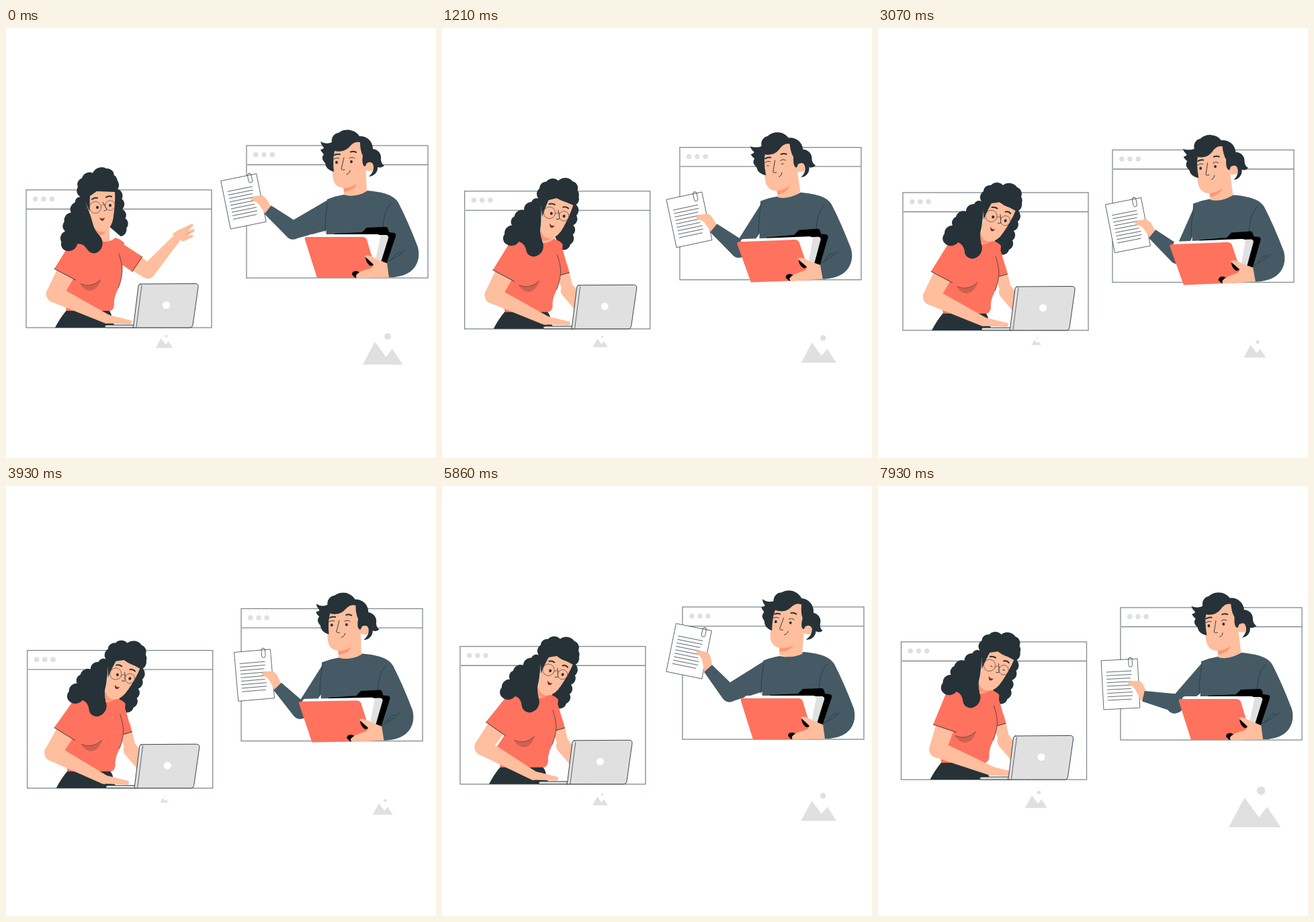
An HTML page for the animation above (8 s loop, 640 px wide and 640 px high).

```html
<!DOCTYPE html>
<html lang="en">
<head>
<meta charset="utf-8">
<title>Online meeting</title>
<style>
html, body { margin: 0; width: 100%; height: 100%; overflow: hidden; background: #fff; }
svg { display: block; width: 100vw; height: 100vh; }
.skin { fill: #ffbe9d; }
.shade { fill: #ff9677; }
.dark { fill: #263238; }
.red { fill: #ff725e; }
.knit { fill: #455a64; }
.gray { fill: #e0e0e0; }
.frame { fill: none; stroke: #7f8a90; stroke-width: 1.3; }
.ink { fill: none; stroke: #263238; stroke-width: .9; stroke-linecap: round; stroke-linejoin: round; }
.brow { stroke-width: 2; }
.fold { stroke-width: .7; }
.rim { stroke: #6b4a40; }
</style>
</head>
<body>
<svg id="stage" viewBox="0 0 640 640"></svg>
<script>
const LOOP = 8000;
const LEAN = 26; // tilt of the woman's head while typing

const frame = (x, y, w, h) => `
  <rect class="frame" x="${x}" y="${y}" width="${w}" height="${h}"/>
  <path class="frame" d="M${x + 1} ${y + 28.5}H${x + w}"/>
  ${[13.8, 26, 38.2].map(d => `<circle class="gray" cx="${x + d}" cy="${y + 13.5}" r="3.8"/>`).join('')}`;

const picture = `
  <path class="gray" d="M-30 23.5L-12 -10.5L4.5 12L14 0L29.5 23.5Z"/>
  <circle class="gray" cx="7" cy="-18.5" r="4.8"/>`;

// chain of outward bumps through the given points
const bumps = (from, ...pts) => {
  let [x, y] = from;
  return `L${from}` + pts.map(([a, b]) => {
    const r = Math.hypot(a - x, b - y) * .68;
    [x, y] = [a, b];
    return `A${r} ${r} 0 0 1 ${a} ${b}`;
  }).join('');
};

const backHair = 'M150 240' + bumps([200, 240], [205, 252], [202, 268], [201, 284],
  [195, 298], [193, 312], [188, 326], [175, 333]) + 'L165 310L150 290Z';
const frontHair = 'M147 254' + bumps([147, 254], [150, 239], [161, 230], [179, 230], [200, 233], [206, 247], [202, 262]) +
  'L193 264Q178 262 166 247Q156 252 150 266Q149 284 146 298Q144 306 147 318' +
  bumps([147, 318], [136, 339], [122, 330]) + 'Q121 318 112 315' +
  bumps([112, 315], [93, 317], [92, 302], [104, 290], [109, 277], [124, 269], [136, 258], [147, 254]) + 'Z';

const woman = `
  ${frame(30, 241, 276, 205)}
  <path id="wBackHair" class="dark" d="${backHair}"/>
  <g id="wNeck">
    <path class="skin" d="M129 285L154 290L154 318Q143 328 132 318Z"/>
    <path class="shade" d="M131 298Q138 306 149 302Q143 312 132 308Z"/>
  </g>
  <path id="rUpper" class="skin"/><path id="rFore" class="skin"/>
  <g id="rHand">
    <path class="skin" d="M-4 -8Q8 -10 14 -8L29 -7Q32 -5 29 -3L18 -1L27 1Q29 4 26 5L15 5L22 8Q22 11 18 11L4 9Z"/>
    <path class="ink fold" style="stroke:#f2916f" d="M15 -3L24 -3M13 2L21 3"/>
  </g>
  <path id="rSleeve" class="red"/><path id="rHem" class="ink"/>
  <path class="dark" d="M73 446Q80 432 91 419L152 419Q157 424 158 432L162 446Z"/>
  <path class="red" d="M104 318Q116 311 132 314Q150 323 163 312Q172 315 176 320L173 362Q172 378 166 390Q160 402 161 412Q160 420 155 421L90 421Q88 410 86 400L85 390L105 360Z"/>
  <path fill="#d0604f" d="M111 382Q126 388 141 376Q135 391 124 391Q116 390 111 382Z"/>
  <path class="ink fold" d="M111 381Q126 388 141 375M168 336Q173 350 173 362Q172 376 167 387"/>
  <path id="lUpper" class="skin"/>
  <path id="lSleeve" class="red"/><path id="lHem" class="ink"/>
  <path id="lFore" class="skin"/><path id="lHand" class="skin"/>
  <g class="ink">
    <path class="gray" d="M149 442H192V446H149Q147 446 147 444Q147 442 149 442Z"/>
    <path class="gray" d="M200 381L282 380.5Q287 381 286 386L278 442Q277 446 274 446L189 446L190 441L197 384Q197.5 381 200 381Z"/>
    <path class="fold" d="M202 383L194 445"/>
  </g>
  <circle cx="238.5" cy="412.5" r="5.5" fill="#fff"/>
  <g id="wFace">
    <path class="skin" d="M125 250Q123 284 130 294Q138 304 148 302Q158 297 160 280Q163 260 162 244L135 243Z"/>
    <path class="ink brow" d="M128 255Q132 252 136 253M149 252Q153 249 157 251"/>
    <path class="ink" d="M144 259Q148 266 150 270Q149 272 146 272"/>
    <ellipse class="dark wEye" cx="136" cy="267" rx="2"/><ellipse class="dark wEye" cx="155" cy="264" rx="2"/>
    <path fill="#7d2f2a" d="M139 282Q143 285 147 282Q146 287 143 287Q140 286 139 282Z"/>
  </g>
  <path id="wFrontHair" class="dark" d="${frontHair}"/>
  <g id="wGlasses" class="ink fold rim">
    <circle cx="133" cy="267" r="8.7"/><circle cx="155" cy="264" r="7.3"/>
    <path d="M141.5 265Q145 261 148 263M124 268L118 269"/>
  </g>`;

const textLines = Array.from({ length: 9 }, (_, i) =>
  `M-20 ${-19 + i * 5.25}H${i % 3 === 2 ? 15 : 17}`).join('');

const manHair = 'M468 169Q477 174 485 170' +
  bumps([485, 170], [495, 156], [526, 161], [546, 180], [558, 195]) + 'Q558 202 563 205Q558 209 553 207' +
  bumps([553, 207], [540, 221]) +
  'Q548 214 547 206Q546 197 537 201Q535 206 534 206Q529 204 531 190Q527 182 527 170Q518 168 511 177' +
  'Q503 186 489 183Q486 195 488 214Q476 211 475 201Q468 194 473 188Q469 184 468 181Q473 180 473 178Q469 174 468 169Z';

const man = `
  ${frame(358, 175, 270, 197)}
  <g id="sheet">
    <rect x="-27" y="-36.5" width="54" height="73" fill="#fff" stroke="#263238" stroke-width=".7"/>
    <path class="ink fold" d="${textLines}"/>
    <rect class="ink fold" x="13.5" y="-39" width="5.5" height="14" rx="2.7"/>
  </g>
  <path id="mWrist" class="skin"/>
  <path id="mHand" class="skin" d="M12 -3Q20 -5 29 -3Q35 2 36 10L33 20L27 22Q24 14 21 8Q18 4 12 1Q10 -1 12 -3Z"/>
  <path id="mSleeve" class="knit"/>
  <path class="knit" d="M478 255Q490 250 503 248Q520 252 538 242C560 244 577 248 584 260Q598 287 613 326C618 345 610 371 569 371L475 371Z"/>
  <path class="ink fold" d="M479 260Q475 280 475 304M561 298Q562 272 573 260"/>
  <g id="files">
    <path d="M488 306L530 304L537 297L566 296Q569 297 570 304L578 305Q581 306 580 310L565 355L540 360Z"/>
    <path class="gray" d="M510 308L566 308Q570 309 569 313L556 355L530 355Z"/>
    <path fill="#fff" d="M450 310Q451 307 455 307L552 307Q558 307 557 312L549 350L530 350L450 318Z"/>
    <path class="red" d="M447 311H530Q535 311 537 315L554 372H463L445 315Q444 311 447 311Z"/>
    <path d="M535 340Q540 340 547 348Q549 354 542 354Q535 349 535 340ZM515 367Q515 361 523 362L530 366L520 372Z"/>
    <path class="skin" d="M534 340Q537 335 552 344L569 351L571 371L524 372.5Q517 370 524 365Q530 361 538 359Q547 357 547 352Q542 347 534 340Z"/>
    <path class="knit" d="M567 349Q585 342 594 331L612 328C618 345 610 371 570 371Z"/>
    <path class="ink fold" d="M567 348Q582 342 594 331M574 344Q580 334 588 333"/>
  </g>
  <g id="mHead">
    <path class="skin" d="M502 215L535 205L537 243Q520 253 503 248Z"/>
    <path class="shade" d="M502 237Q512 238 522 232Q518 242 503 244Z"/>
    <path class="skin" d="M487 182Q486 205 486 218Q487 239 505 238Q518 237 528 226L535 212Q549 216 547 206Q546 197 538 200L530 168L500 176Z"/>
    <path class="dark" d="${manHair}"/>
    <path class="ink brow" d="M489 189Q493 187 497 188M513 184.5Q517 183 521 185"/>
    <path class="ink" d="M488 195Q492 192 496 194M511 194Q515 191 519 194M503 193Q501 202 499 210Q501 212 504 211M507 218Q512 216 512 212"/>
    <ellipse class="dark mEye" cx="492" cy="200" rx="1.9"/><ellipse class="dark mEye" cx="514" cy="199" rx="1.9"/>
  </g>`;

document.getElementById('stage').innerHTML =
  `<g id="left">${woman}</g><g id="right">${man}</g>
   <g id="small">${picture}</g><g id="big">${picture}</g>`;

const $ = id => document.getElementById(id);
const set = (id, name, value) => $(id).setAttribute(name, value);
const move = (id, x, y, more = '') => set(id, 'transform', `translate(${x} ${y}) ${more}`);
const turn = (id, angle, x, y) => set(id, 'transform', `rotate(${angle} ${x} ${y})`);

const mix = (a, b, u) => a + (b - a) * u;
// eased 0 to 1 between two times
const ramp = (t, a, b) => {
  const u = Math.min(1, Math.max(0, (t - a) / (b - a)));
  return u * u * (3 - 2 * u);
};

// keys are [time, ...values]; drifting passes through them, otherwise each is a rest
function follow(t, keys, drift = false) {
  let i = 0;
  while (i < keys.length - 2 && t > keys[i + 1][0]) i++;
  const p = keys[i], q = keys[i + 1], h = q[0] - p[0];
  const u = (t - p[0]) / h, s = u * u * (3 - 2 * u);
  const slope = (j, c) => {
    const a = keys[Math.max(j - 1, 0)], b = keys[Math.min(j + 1, keys.length - 1)];
    return drift ? (b[c] - a[c]) / (b[0] - a[0]) * h : 0;
  };
  return p.slice(1).map((v, k) => mix(v, q[k + 1], s) +
    slope(i, k + 1) * u * (1 - u) ** 2 - slope(i + 1, k + 1) * u * u * (1 - u));
}

const drift = [ // time, left window x y, right window x y
  [0, 0, 0, 0, 0],
  [3070, 7, 4, -9, 6.5],
  [4790, -4, 2, -5, 7.5],
  [6860, 0, -6.5, 4, 3],
  [7930, 4.5, -9, 3, 6]
];
const sheet = [ // time, x, y, angle
  [0, 353.5, 258, -11.5],
  [1400, 373, 284, -12],
  [3070, 381, 287, -11],
  [5600, 368, 239, 12],
  [7930, 358, 289, -3]
];
const zoom = [[0, 1], [3800, .5], [8000, 1.3]];

function unit(a, b) {
  const d = Math.hypot(b[0] - a[0], b[1] - a[1]);
  return [(b[0] - a[0]) / d, (b[1] - a[1]) / d];
}
const along = (p, [ux, uy], d) => [p[0] + ux * d, p[1] + uy * d];
const side = (p, [ux, uy], r) => [p[0] - uy * r, p[1] + ux * r];

// joint of a two-bone arm
function elbow(a, b, m, n, bend) {
  const d = Math.hypot(b[0] - a[0], b[1] - a[1]), u = unit(a, b);
  const x = (m * m - n * n + d * d) / (2 * d);
  return side(along(a, u, x), u, bend * Math.sqrt(Math.max(0, m * m - x * x)));
}

// limb with round ends
function limb(id, a, b, ra, rb) {
  const u = unit(a, b);
  set(id, 'd', `M${side(a, u, ra)}L${side(b, u, rb)}A${rb} ${rb} 0 0 0 ${side(b, u, -rb)}` +
    `L${side(a, u, -ra)}A${ra} ${ra} 0 0 0 ${side(a, u, ra)}Z`);
}

// short sleeve with the bare upper arm below it
function upperArm(id, s, e, length, half, top, r) {
  const u = unit(s, e), c = along(s, u, length);
  const p = side(c, u, half), q = side(c, u, -half);
  set(id + 'Sleeve', 'd', `M${side(s, u, top)}L${p}L${q}L${side(s, u, -top)}A${top} ${top} 0 0 0 ${side(s, u, top)}Z`);
  set(id + 'Hem', 'd', `M${p}L${q}`);
  limb(id + 'Upper', along(c, u, -r), e, r, r - 2);
}

function blink(eyes, gap) {
  const ry = 2.2 * Math.max(.25, Math.min(1, gap / 140));
  document.querySelectorAll(eyes).forEach(e => e.setAttribute('ry', ry));
}

function drawWoman(t) {
  const tilt = LEAN * ramp(t, 0, 1700);
  for (const id of ['wNeck', 'wFace', 'wGlasses']) move(id, tilt * .03, -tilt * .1, `rotate(${tilt} 122 333)`);
  for (const id of ['wBackHair', 'wFrontHair']) turn(id, tilt - LEAN, 123, 331);
  blink('.wEye', Math.abs(t - 7930));

  const ls = [109, 327];
  const lw = [150 - 11 * ramp(t, 3070, 4790) + 25 * ramp(t, 5860, 6860), 433];
  const le = elbow(ls, lw, 78, 86, 1);
  upperArm('l', ls, le, 45, 18, 15, 14.5);
  limb('lFore', le, lw, 12.5, 7);
  limb('lHand', lw, along(lw, [1, .14], 34), 6.5, 3);

  const rs = [168, 333], down = ramp(t, 0, 1150);
  const re = [mix(211, 184, down), mix(362, 389, down)];
  const rw = [mix(255, 208, down), mix(312, 420, down)];
  const [ux, uy] = unit(re, rw);
  upperArm('r', rs, re, 33, mix(13.5, 9, down), mix(13, 9, down), mix(13, 10, down));
  limb('rFore', re, rw, 11, mix(6, 9, down));
  move('rHand', ...rw, `rotate(${Math.atan2(uy, ux) * 180 / Math.PI + 18})`);
}

function drawMan(t) {
  const look = ramp(t, 0, 1100), back = ramp(t, 3070, 4790);
  turn('mHead', -4.5 * look + 11.5 * back - 8 * ramp(t, 5860, 6860) - 3 * ramp(t, 6860, 7930), 520, 238);
  turn('files', 2.2 * (back - look), 565, 350);
  blink('.mEye', Math.abs(t - 1210));

  const [x, y, angle] = follow(t, sheet);
  for (const id of ['sheet', 'mHand']) move(id, x, y, `rotate(${angle})`);

  const r = angle * Math.PI / 180, cos = Math.cos(r), sin = Math.sin(r);
  const onSheet = (a, b) => [x + a * cos - b * sin, y + a * sin + b * cos];
  const w = onSheet(33, 19.5), e = elbow([480, 278], w, 58, 46.5, -1);
  limb('mWrist', onSheet(30, 10), w, 6, 6.5);
  const u = unit(e, w), [ex, ey] = e;
  set('mSleeve', 'd', `M482 254L${ex + 2} ${ey - 14}L${side(w, u, 8)}L${side(w, u, -8)}` +
    `L${ex - 9} ${ey + 10}Q${ex - 2} ${ey + 19} ${ex + 9} ${ey + 13}L478 301Z`);
}

function draw(t) {
  const [lx, ly, rx, ry] = follow(t, drift, true);
  move('left', lx, ly);
  move('right', rx, ry);
  drawWoman(t);
  drawMan(t);
  const [s] = follow(t, zoom);
  move('big', 561, 477.5, `scale(${s})`);
  move('small', 235.7, 466.3, `scale(${s * .425})`);
}

function tick() {
  draw(performance.now() % LOOP);
  requestAnimationFrame(tick);
}
tick();
</script>
</body>
</html>
```
